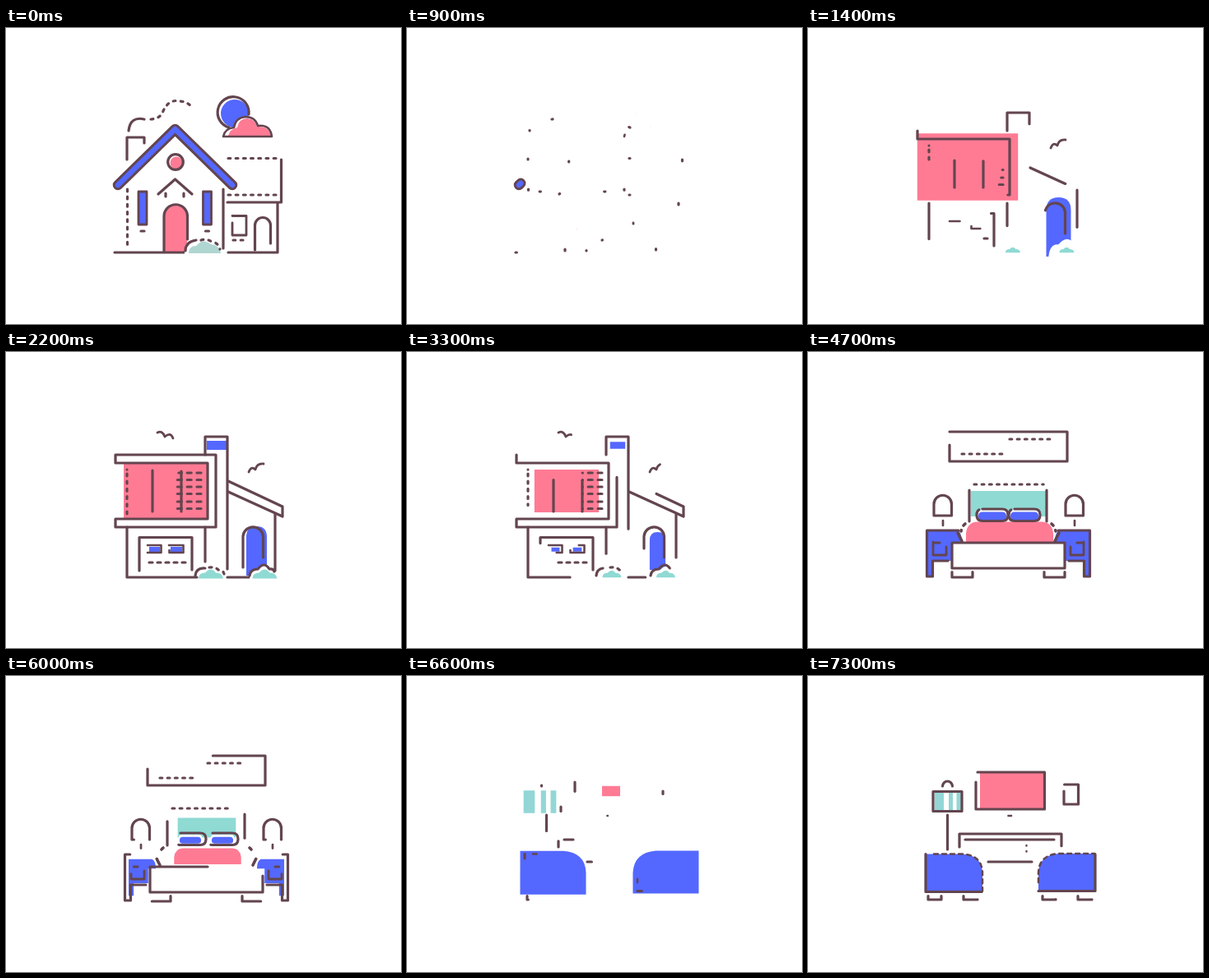
An HTML page with a canvas that plays this animation: 480x360 px, repeating every 8000 ms.

```html
<!DOCTYPE html>
<html lang="en">
<head>
<meta charset="utf-8">
<title>Home line icons</title>
<style>
  html, body { margin: 0; width: 100%; height: 100%; overflow: hidden; background: #fff; }
  canvas { display: block; }
  svg { position: absolute; width: 0; height: 0; overflow: visible; }
</style>
</head>
<body>
<canvas width="480" height="360"></canvas>
<svg><path fill="none"/></svg>
<script>
const ctx = document.querySelector('canvas').getContext('2d');
const ruler = document.querySelector('path');
const LOOP = 8000, STEP = 100;
const INK = '#63454f', BLUE = '#5468ff', PINK = '#ff7b94', TEAL = '#8fdad3', PALE = '#b0d6d2', WHITE = '#fff';

function item(d, options) {
  ruler.setAttribute('d', d);
  const box = ruler.getBBox();
  return {
    path: new Path2D(d), length: ruler.getTotalLength(),
    cx: box.x + box.width / 2, cy: box.y + box.height / 2,
    delay: 0, speed: 1, over: 1.2, width: 3.2, color: INK, ...options
  };
}
const line = (d, o) => item(d, { kind: 'line', ...o });
const quick = (d, o) => line(d, { speed: 2.2, ...o });
const dash = (d, o) => item(d, { kind: 'line', dash: [2.8, 6.4], ...o });
const fill = (d, color, o) => item(d, { kind: 'fill', color, ...o });
const rect = (x, y, r, b) => `M${x} ${y}H${r}V${b}H${x}Z`;
const round = (x, y, r, b, q) =>
  `M${x + q} ${y}H${r - q}Q${r} ${y} ${r} ${y + q}V${b - q}Q${r} ${b} ${r - q} ${b}H${x + q}Q${x} ${b} ${x} ${b - q}V${y + q}Q${x} ${y} ${x + q} ${y}Z`;
const circle = (x, y, r) => `M${x - r} ${y}a${r} ${r} 0 1 1 ${2 * r} 0a${r} ${r} 0 1 1 ${-2 * r} 0Z`;
const bush = (x, y) => `M${x} ${y}q0 -7 8 -7q7 -8 13 0q8 0 9 7Z`;
const foot = (x, r, y, b, o) => line(`M${x} ${y}V${b}H${r}V${y}`, o);

const LATE = { delay: 180 }, LATER = { delay: 310 };
const cloud = 'M264 132Q266 122 277 121Q279 109 291 108Q303 108 306 119Q321 117 323 132Z';
const chevron = 'M136 191L205.5 123L275 191';

const cottage = [
  fill(circle(278, 104, 17), BLUE),
  line('M271 121A19 19 0 1 1 295 105'),
  fill(cloud, WHITE),
  fill('M270 131Q272 123 281 121Q283 110 293 110Q303 111 305 120Q319 119 322 131Z', PINK),
  line(cloud, { width: 2.6 }),
  line('M147 160V133H168V140'),
  line('M149 125Q151 107 168 111'),
  dash('M176 111Q188 110 191 101Q198 86 211 89Q219 89 226 96'),
  dash('M147.5 196V268'),
  line('M264 196V268'),
  line(chevron, { width: 12.5 }),
  line(chevron, { width: 6.5, color: BLUE }),
  fill(circle(207, 164, 7.5), PINK),
  line(circle(206, 163, 9.3)),
  line('M185 202L205.5 184L226 202'),
  dash('M194 201V206M216 201V206', { dash: [4, 1] }),
  fill('M192 273V230Q193 216 206 216Q220 217 220 231V273Z', PINK),
  line('M192 271V229A14.2 14.2 0 0 1 220.5 229V257'),
  ...[161, 239.5].flatMap(x => [
    fill(rect(x, 198, x + 10, 240), BLUE),
    line(rect(x, 199, x + 10, 239), { width: 2.8 }),
    quick(`M${x + 3} 247H${x + 7}`)
  ]),
  line('M132 273H217'),
  fill('M217 276V266Q221 257 232 258Q244 250 252 260Q262 262 263 276Z', WHITE),
  fill('M222 274Q222 265 231 265Q239 255 249 263Q260 264 261 274Z', PALE),
  line('M218 271Q218 260 231 258'),
  dash('M237 258Q244 256 250 260Q258 261 260 269'),
  dash('M270 158.5H332'),
  line('M334.5 160V212H269'),
  dash('M270 203H328'),
  line('M330 213V273H270'),
  line('M275 237V252H292V228.5H275', { width: 2.8 }),
  dash('M276 258H291'),
  line('M302.5 270V240A9.5 9.5 0 0 1 321.5 240V262')
];

const villa = [
  fill(rect(143, 135, 245, 203), PINK),
  fill(rect(244, 108, 268, 119), BLUE, { delay: 450 }),
  fill('M292 272V225Q292 212 304.5 212Q317 212 317 225V272Z', BLUE),
  line('M133 125V135H245V203H133V213H255V125H133'),
  line('M242 125V103H269V264'),
  line('M270 170L336 200V188L270 157'),
  quick('M242 213V255'),
  quick('M327 197V266'),
  line('M147 213V274H232'),
  line('M226 265V225.5H162V266'),
  quick('M178 194V144'),
  quick('M213 194V145'),
  dash('M147 148V198M147 143V143.1'),
  ...[190.5, 182, 172.5, 164, 155.5, 147].map((y, i) =>
    dash(`M237 ${y}H206`, { dash: [5, 6.8], delay: 100 + i * 70 })),
  fill(rect(174, 237, 187, 243.5), BLUE, { delay: 450 }),
  fill(rect(200, 237, 214, 243.5), BLUE, { delay: 450 }),
  line('M172 235H188.5V244H172', { width: 2.6 }),
  line('M198.5 241V244H215.5V235H198', { width: 2.6 }),
  dash('M218 256H168', { dash: [4, 6], delay: 100 }),
  line('M312.5 250V224A12.3 12.3 0 0 0 288 224V262', { speed: 2 }),
  line('M269 274H296', LATER),
  fill('M296 277Q297 263 306 264Q315 253 323 264L333 277Z', WHITE),
  fill(bush(234, 275.5), TEAL, LATER),
  fill(bush(299.5, 275.5), TEAL, LATER),
  line('M230 272Q231 262 242 263', LATER),
  dash('M247 262Q254 261 258 265Q264 265 265 270', LATER),
  line('M296 272Q297 264 306 264Q314 254 320 264Q325 263 326 267', LATER),
  line('M184 98Q190 95 193 103Q200 97 203 105', { width: 2.8, ...LATER }),
  line('M295 146Q298 138 303 143Q305 135 313 136', { width: 2.8, speed: 4 })
];

function nightstand(flip) {
  const m = x => flip ? 487 - x : x;
  return [
    fill(`M${m(144)} 216H${m(181)}Q${m(187)} 219 ${m(187)} 231H${m(175)}V254H${m(152)}V274H${m(144)}Z`, BLUE, { over: 1.04 }),
    line(`M${m(170)} 254H${m(151.5)}V273H${m(144.5)}V217H${m(183)}`),
    line(`M${m(168)} 237V247H${m(152)}V231`, { width: 2.8, speed: 2.2 }),
    quick(`M${m(160)} 232H${m(154)}`),
    quick(`M${m(187)} 230L${m(182)} 220`),
    dash(`M${m(191)} 209Q${m(187)} 212 ${m(186)} 218`)
  ];
}
const lamp = x => [
  line(`M${x + 21.5} 199V185A10.7 10.7 0 0 0 ${x} 185V199H${x + 21.5}`),
  quick(`M${x + 11} 205V211`, { width: 2.7, ...LATE })
];
const bedroom = [
  line('M172 113V133H315V97H172'),
  dash('M245 106H303', LATE),
  dash('M187 124H243', LATE),
  fill(rect(198, 169, 290, 200), TEAL, { delay: 148 }),
  dash('M202 161H291', LATE),
  line('M196 206V168', { speed: 10 }),
  quick('M290 168V206', LATE),
  ...lamp(153),
  ...lamp(313),
  ...nightstand(false),
  ...nightstand(true),
  fill('M192 232V221Q193 207 206 206.5H284Q297 207 298 221V232Z', PINK),
  // Bedside corners stay visible while the blanket is still oversized.
  ...[false, true].flatMap(flip => nightstand(flip).slice(-2)),
  ...[205, 244].flatMap(x => [
    fill(round(x, 191, x + 38, 206, 7), WHITE, { delay: 260 }),
    fill(round(x + 2, 194.5, x + 36, 205, 5), BLUE, { delay: 260 }),
    line(round(x, 191, x + 38, 205.5, 7), LATE)
  ]),
  fill(rect(175, 235, 312, 263), WHITE, { over: 1 }),
  line('M312 243V263H175V232H312V243'),
  foot(200, 175, 267.5, 274),
  foot(287, 312, 267.5, 274)
];

const lounge = [
  fill(rect(209, 118, 287, 162), PINK, { delay: 142 }),
  line('M204 129V162H287.5V117H204'),
  quick('M243.5 170H247', { width: 2.6 }),
  line('M311 140V156H328.5V132H311'),
  fill(rect(154, 142, 165, 164) + rect(171, 142, 176, 164) + rect(180.5, 142, 186, 164), '#93d6d6',
    { over: 1.24, shift: -8.5 }),
  line('M187 164.5V140.5H152V164.5H187'),
  line('M163.5 134A6 6 0 0 1 175.5 134'),
  line('M169.5 169V211', { speed: 10 }),
  line('M184 208V192H308V208'),
  quick('M191 199H299'),
  quick('M219 226H272'),
  dash('M265.5 206V221', { dash: [.5, 6.5], width: 2.4, ...LATE }),
  fill('M143 216.5H188Q211 218 212 239V262H143Z', BLUE, { over: 1.16 }),
  line('M143 216.5V262.5H212'),
  dash('M153 216.5H188Q211 218 212 239V262', { dash: [5, 5], width: 2.5 }),
  fill('M349 216H304Q281 218 280 239V261H349Z', BLUE, { over: 1.16 }),
  line('M280 261.5H349V216'),
  dash('M280 251V239Q281 218 304 216H349', { dash: [5, 5], width: 2.5 }),
  foot(146, 162, 267.5, 272, { speed: 5 }),
  foot(189, 206, 267.5, 272, LATE),
  foot(285, 301, 267.5, 272, LATE),
  foot(328, 345, 267.5, 272, LATE)
];

const scenes = [
  { items: cottage, start: -2200, end: 500 },
  { items: villa, start: 500, end: 3200 },
  { items: bedroom, start: 3200, end: 5900 },
  { items: lounge, start: 5900, end: 8600 }
];

const clamp = x => Math.min(1, Math.max(0, x));
const ease = x => (1 - Math.cos(Math.PI * clamp(x))) / 2;

// Fills pop past full size, rest, then settle.
function popScale(age, { delay, over }) {
  const grow = ease((age - 500 - delay) / 180);
  const settle = ease((age - 900 - delay) / 320);
  return grow * (over + (1 - over) * settle);
}

function drawFill(it, age, left) {
  const scale = popScale(age, it) * left;
  if (scale <= 0) return;
  const shift = (it.shift || 0) * (1 - ease((age - 900) / 320));
  ctx.save();
  ctx.translate(it.cx + shift, it.cy);
  ctx.scale(scale, scale);
  ctx.translate(-it.cx, -it.cy);
  ctx.fillStyle = it.color;
  ctx.fill(it.path);
  ctx.restore();
}

function drawLine(it, age, left) {
  const shown = it.length * clamp(ease((age - 580 - it.delay) / 870) * it.speed) * left;
  if (shown < .3) return;
  const pattern = [];
  if (it.dash) {
    const [on, off] = it.dash;
    for (let at = 0; at < shown; at += on + off) pattern.push(Math.min(on, shown - at), off);
    pattern[pattern.length - 1] = it.length * 2;
  } else if (shown < it.length) {
    pattern.push(shown, it.length * 2);
  }
  ctx.setLineDash(pattern);
  ctx.strokeStyle = it.color;
  ctx.lineWidth = it.width;
  ctx.stroke(it.path);
}

function draw(time) {
  ctx.fillStyle = WHITE;
  ctx.fillRect(0, 0, 480, 360);
  ctx.lineCap = ctx.lineJoin = 'round';
  for (const { items, start, end } of scenes) {
    if (time < start || time >= end + 500) continue;
    const left = time < end ? 1 : 1 - ease((time - end + 60) / 500);
    for (const it of items) (it.kind === 'fill' ? drawFill : drawLine)(it, time - start, left);
  }
}

const origin = performance.now();
function tick() {
  const time = (performance.now() - origin) % LOOP;
  draw(Math.floor(time / STEP) * STEP);
  requestAnimationFrame(tick);
}
tick();
</script>
</body>
</html>
```
